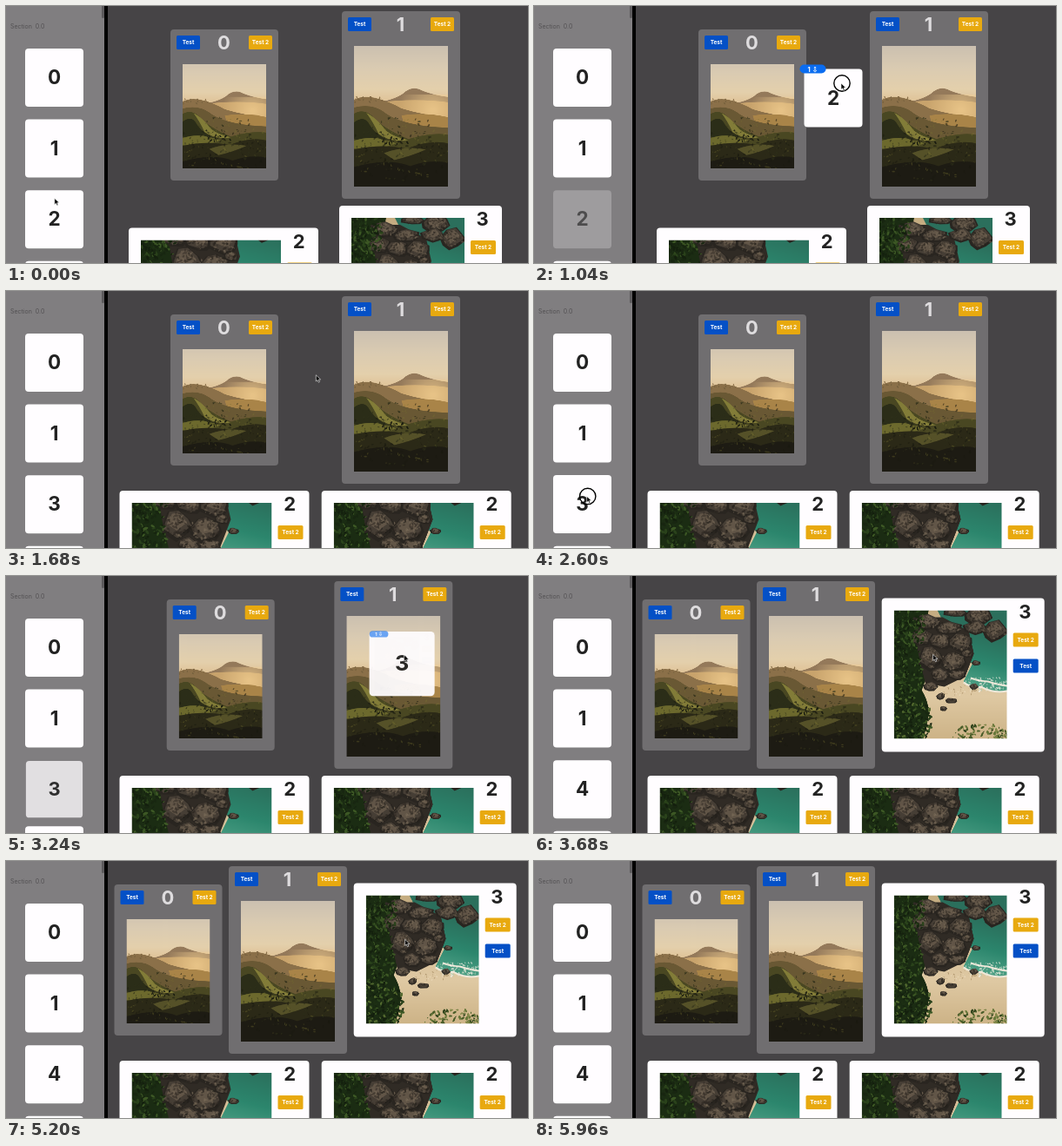
These frames come from a looping animation (600x296 px, 6000 ms). An HTML page with a canvas:

```html
<!DOCTYPE html>
<html lang="en">
<head>
<meta charset="utf-8">
<title>Drag and drop between two collections</title>
<style>
html, body { margin: 0; width: 100%; height: 100%; overflow: hidden; background: #464446; }
#stage { position: absolute; left: 0; top: 0; width: 600px; height: 296px; overflow: hidden;
  background: #464446; font-family: Inter, Roboto, sans-serif; }
#stage div, canvas, svg { position: absolute; left: 0; top: 0; box-sizing: border-box; }
#stage .side { width: 113px; height: 296px; background: #807e80; overflow: hidden; }
#stage .rule { left: 113px; width: 4px; height: 296px; background: #000; }
#stage .thumb { left: 110px; width: 3px; height: 14px; background: #5c5a5c; border-radius: 0 0 2px 2px; }
#stage .section { left: 5px; top: 19px; font-size: 7px; line-height: 10px; color: #525052; white-space: pre; }
.tile { width: 67px; height: 67px; border-radius: 4px; background: #fffdff; color: #222;
  font-size: 22.5px; font-weight: 700; line-height: 66px; text-align: center; }
.card { border-radius: 4px; background: #fffdff; color: #222; transform-origin: 0 0; }
.card.dark { background: #706e70; color: #dedcde; }
.title { width: 30px; height: 24px; font-size: 22px; font-weight: 700; line-height: 24px; text-align: center; }
.button { height: 16px; border-radius: 1.5px; color: #fff; font-size: 6.5px; font-weight: 700;
  line-height: 16px; text-align: center; white-space: pre; }
.preview { transform-origin: 0 0; }
.badge { width: 30px; height: 10px; border-radius: 5px; background: #0a6cf0; color: #fff; font-size: 7.5px;
  font-weight: 700; line-height: 10px; text-align: center; white-space: pre; }
.badge span { font-family: "DejaVu Sans", sans-serif; font-size: 8.5px; }
</style>
</head>
<body>
<div id="stage"></div>
<script>
const LOOP = 6000, DROP = 400, TILE = 67;
const stage = document.getElementById('stage');

const clamp = v => Math.max(0, Math.min(1, v));
const ease = v => { v = clamp(v); return v * v * (3 - 2 * v); };
const mix = (a, b, p) => a + (b - a) * p;

function add(parent, cls, text = '', box = {}) {
  const el = document.createElement('div');
  el.className = cls;
  el.textContent = text;
  for (const k in box) el.style[k] = box[k] + 'px';
  parent.append(el);
  return el;
}

function random(seed) {
  return () => {
    seed = (seed * 1664525 + 1013904223) >>> 0;
    return seed / 4294967296;
  };
}

function layers(g, list) {
  for (const [color, d] of list) {
    g.fillStyle = color;
    g.fill(new Path2D(d));
  }
}

function gradient(g, x, y, colors) {
  const fill = g.createLinearGradient(0, 0, x, y);
  colors.forEach((c, i) => fill.addColorStop(i / (colors.length - 1), c));
  return fill;
}

// Small random dabs inside an ellipse
function scatter(g, rnd, n, [cx, cy, rx, ry], size, colors) {
  for (let i = 0; i < n; i++) {
    const a = rnd() * 6.283, d = Math.sqrt(rnd()), s = size * (0.5 + rnd());
    g.fillStyle = colors[Math.floor(rnd() * colors.length)];
    g.beginPath();
    g.ellipse(cx + Math.cos(a) * rx * d, cy + Math.sin(a) * ry * d, s, s * 0.5, rnd() * 3.14, 0, 6.283);
    g.fill();
  }
}

function hills(g) {
  const rnd = random(7);
  g.fillStyle = gradient(g, 0, 100, ['#cbc0b0', '#dacbb2', '#e4d0ac', '#dcb988', '#b08d5a']);
  g.fillRect(0, 0, 107, 162);
  layers(g, [
    ['#94795a', 'M28 65Q46 62 56 55Q64 47 74 50Q86 56 107 59V70H28Z'],
    ['#c8a36c', 'M30 65Q70 60 107 65V100H30Z']
  ]);
  const glow = g.createRadialGradient(90, 74, 2, 90, 74, 40);
  glow.addColorStop(0, 'rgba(244,208,146,.7)');
  glow.addColorStop(1, 'rgba(244,208,146,0)');
  g.fillStyle = glow;
  g.fillRect(0, 56, 107, 60);
  layers(g, [
    ['#8b7049', 'M0 62Q10 57 24 60Q40 64 54 72Q80 80 107 82V110H0Z'],
    ['#a98448', 'M54 80Q80 76 107 82V100H60Z'],
    ['#695834', 'M0 71Q20 66 34 76Q54 92 107 94V125H0Z'],
    ['#494722', 'M0 78Q10 72 20 80Q34 96 62 107Q90 99 107 102V162H0Z'],
    ['#827c38', 'M14 77Q26 83 36 97Q46 105 62 108Q44 112 28 101Q22 88 14 77Z'],
    ['#2b2d18', 'M0 88Q12 79 18 91Q26 104 44 110L30 116L0 107Z'],
    ['#6c692d', 'M0 109Q22 101 48 112Q30 120 0 118Z'],
    ['#2b2917', 'M0 119Q30 112 60 118Q88 107 107 112V162H0Z'],
    ['#555128', 'M34 123Q58 114 82 119Q64 127 46 131Z'],
    ['#1d1b13', 'M0 139Q40 128 64 138Q86 130 107 134V162H0Z']
  ]);
  scatter(g, rnd, 240, [52, 118, 62, 38], 1.3, ['#1b1b1188', '#7b743455', '#2f301a99']);
  scatter(g, rnd, 40, [10, 62, 24, 4], 1, ['#75603e', '#8b7049']);
  scatter(g, rnd, 24, [46, 109, 17, 5], 1.4, ['#191b10', '#242414']);
}

function rock(g, rnd, x, y, rx, ry) {
  const spots = Array.from({ length: 8 }, (_, i) => {
    const a = i * 0.785 + rnd() * 0.4, d = 0.85 + rnd() * 0.3;
    return [Math.cos(a) * d * rx, Math.sin(a) * d * ry];
  });
  [['#292520', 1, 0], ['#463e35', 0.84, 0.12], ['#615547', 0.55, 0.25]].forEach(([c, k, lift]) => {
    g.fillStyle = c;
    g.beginPath();
    spots.forEach(([dx, dy]) => g.lineTo(x + dx * k, y + dy * k - ry * lift));
    g.fill();
  });
  const n = Math.round(rx * ry * 0.35);
  scatter(g, rnd, n, [x, y, rx * 0.85, ry * 0.8], 1.4, ['#231f1b99', '#332d2699', '#83745f66']);
}

function cove(g) {
  const rnd = random(21);
  const greens = ['#14200e', '#1d2f14', '#2a421b', '#3d5825', '#182611'];
  g.fillStyle = gradient(g, 0, 148, ['#c4ab80', '#d2bb94', '#dfc9a3', '#cdb387']);
  g.fillRect(0, 0, 130, 148);
  g.fillStyle = gradient(g, -25, 95, ['#2b6f5c', '#2c866d', '#53a489', '#b3cdb3']);
  g.fill(new Path2D('M50 0H130V92Q114 96 100 88Q88 90 80 82L90 62L60 20Z'));
  g.strokeStyle = '#f0e9da';
  g.lineWidth = 2;
  g.stroke(new Path2D('M80 83Q90 90 100 88Q114 96 130 93M88 78Q100 82 108 82Q120 86 130 87'));
  scatter(g, rnd, 90, [106, 85, 26, 9], 1.2, ['#f5f1e6bb', '#dfe5d6aa', '#a9cbb499']);
  layers(g, [
    ['#1b2c13', 'M0 0H40Q34 24 40 44Q42 68 32 92Q44 112 38 130L34 148H0Z'],
    ['#302b25', 'M22 8H56L86 24L92 50L82 76L58 88L36 84L28 50Z']
  ]);
  const rocks = [
    [70, 3, 13, 5], [98, 7, 16, 11], [116, 24, 15, 12], [94, 20, 14, 8],
    [38, 14, 17, 10], [62, 21, 17, 8], [32, 32, 14, 10], [54, 36, 14, 9], [77, 37, 15, 11],
    [42, 55, 15, 14], [68, 59, 17, 12], [84, 50, 7, 5], [52, 75, 11, 9], [72, 74, 10, 6],
    [94, 61, 5, 3], [92, 88, 5, 4], [42, 88, 8, 6], [54, 99, 5, 4], [66, 104, 7, 3], [57, 113, 4, 3]
  ];
  rocks.forEach(r => rock(g, rnd, ...r));
  scatter(g, rnd, 50, [70, 92, 26, 7], 0.9, ['#a58a62aa', '#efe0c3aa']);
  scatter(g, rnd, 320, [10, 20, 27, 30], 1.9, greens);
  scatter(g, rnd, 300, [8, 68, 25, 42], 1.9, greens);
  scatter(g, rnd, 360, [14, 128, 30, 30], 1.9, [...greens, '#53692f']);
  scatter(g, rnd, 180, [100, 148, 36, 17], 1.8, ['#4a5d29', '#68783a', '#33451e', '#83894a']);
}

// Paints a picture so that it covers the box, centred
function photo(parent, draw, bw, bh, x, y, w, h) {
  const c = document.createElement('canvas'), g = c.getContext('2d');
  c.width = w * 2;
  c.height = h * 2;
  Object.assign(c.style, { left: x + 'px', top: y + 'px', width: w + 'px', height: h + 'px' });
  const k = 2 * Math.max(w / bw, h / bh);
  g.translate(w - bw * k / 2, h - bh * k / 2);
  g.scale(k, k);
  draw(g);
  parent.append(c);
}

function button(parent, text, left, top, width) {
  add(parent, 'button', text, { left, top, width }).style.background = text === 'Test' ? '#0450c6' : '#e8a90f';
}

function darkCard(n, w, h) {
  const el = add(stage, 'card dark', '', { width: w, height: h });
  add(el, 'title', n, { left: w / 2 - 15.5, top: 3.2 });
  button(el, 'Test', 7, 7, 27);
  button(el, 'Test 2', w - 34, 7, 27);
  photo(el, hills, 107, 162, 14, 40, w - 28.5, h - 54.5);
  return { el, w, h };
}

function lightCard(n, w, h) {
  const el = add(stage, 'card', '', { width: w, height: h });
  photo(el, cove, 130, 148, 14, 14.2, w - 57, h - 28.5);
  add(el, 'title', n, { left: w - 37.3, top: 3.2 });
  button(el, 'Test 2', w - 36, 40, 29);
  button(el, 'Test', w - 36, 70, 29);
  return { el, w, h };
}

function place(el, x, y, sx = 1, sy = 1) {
  el.style.transform = `translate(${x}px,${y}px) scale(${sx},${sy})`;
}

const zero = darkCard(0, 124, 174), one = darkCard(1, 136, 216);
const oldTwo = lightCard(2, 218, 126), oldThree = lightCard(3, 187, 176.5);

const side = add(stage, 'side');
add(stage, 'rule');
add(side, 'thumb');
add(side, 'section', 'Section  0.0');
const slotY = i => 49 + 81.6 * i;
const tiles = [0, 1, 2, 3, 4, 5].map(n => add(side, 'tile', n, { left: 22 }));

// Each drag: lift and drop times, offset from pointer to tile centre, final box
const drags = [
  { n: 2, lift: 400, drop: 1272, dx: -9, dy: 17, x: 130.5, y: 230, card: lightCard(2, 218, 126) },
  { n: 3, lift: 2600, drop: 3178, dx: -5.2, dy: 9.2, x: 399.7, y: 25.5, card: lightCard(3, 187, 176.5) }
];
for (const d of drags) {
  d.preview = add(stage, 'tile preview', d.n);
  d.badge = add(stage, 'badge', '1 ');
  d.badge.append(Object.assign(document.createElement('span'), { textContent: '⇩' }));
}

stage.insertAdjacentHTML('beforeend', `<svg width="600" height="296">
  <circle id="ring" r="9.2" fill="none" stroke="#000" stroke-width="1.4"/>
  <path id="arrow" d="M0 0V7.2L1.7 5.7L2.9 8.4L4.2 7.8L3 5.2L5.3 5.1Z" fill="#000" stroke="#fff" stroke-width=".6"/>
</svg>`);
const ring = document.getElementById('ring'), arrow = document.getElementById('arrow');

const path = [
  [0, 55.8, 221.5], [160, 64.5, 228.5], [400, 64.5, 228.5], [960, 353, 89], [1300, 353, 89],
  [1640, 356.3, 96.8], [1760, 356.3, 96.8], [2400, 60.7, 236.4], [2620, 60.7, 236.4],
  [3080, 457.6, 91], [3240, 457.6, 91], [3600, 458.6, 90.3], [5200, 458.6, 90.3],
  [5680, 470, -16], [LOOP, 470, -16]
];
const presses = [[200, 1272], [2440, 3178]];

function pointer(t) {
  const i = path.findIndex(k => k[0] > t);
  const [t0, x0, y0] = path[i - 1], [t1, x1, y1] = path[i];
  const p = ease((t - t0) / (t1 - t0));
  return [mix(x0, x1, p), mix(y0, y1, p)];
}

function drawDrag(d, t, p) {
  const held = t >= d.lift, dropped = t >= d.drop;
  const [px, py] = pointer(Math.min(t, d.drop));
  const { w, h, el } = d.card;
  const cw = mix(TILE, w, p), ch = mix(TILE, h, p);
  const x = mix(px + d.dx, d.x + w / 2, p) - cw / 2;
  const y = mix(py + d.dy, d.y + h / 2, p) - ch / 2;
  place(el, x, y, cw / w, ch / h);
  el.style.opacity = dropped ? Math.min(1, p * 1.5) : 0;
  place(d.preview, x, y, cw / TILE, ch / TILE);
  d.preview.style.opacity = held ? 1 - p : 0;
  const shown = clamp((t - d.lift - 150) / 120) * clamp(1 - 6 * p);
  place(d.badge, x - 5 + p * 15, y - 5 + p * 45, mix(0.3, 1, shown), mix(0.3, 1, shown));
  d.badge.style.opacity = shown;
}

function drawTile(el, n, t, ps) {
  let row = n, scale = 1, plate = 1, ink = 1;
  drags.forEach((d, i) => {
    if (n > d.n) row -= ps[i];
    if (n !== d.n) return;
    if (t >= d.drop) {
      plate = 0.82 * (1 - ps[i]);
      ink = 1 - ps[i];
      scale = 1 - 0.4 * ps[i];
    } else if (t >= d.lift) {
      plate = 0.23;
      ink = 0.65;
    }
  });
  place(el, 0, slotY(row), scale, scale);
  el.style.background = `rgba(255,253,255,${plate})`;
  el.style.color = `rgba(34,34,34,${ink})`;
}

function render(t) {
  const ps = drags.map(d => ease((t - d.drop) / DROP));
  const [a, b] = ps;
  place(zero.el, mix(189, 124.5, b), 27);
  place(one.el, mix(386, 256, b), 6);
  place(oldTwo.el, mix(141, 362.7, a), mix(255.5, 230, a));
  place(oldThree.el, mix(383, 162, a), mix(230, 364, a));
  drags.forEach((d, i) => drawDrag(d, t, ps[i]));
  tiles.forEach((el, n) => drawTile(el, n, t, ps));
  const [x, y] = pointer(t);
  arrow.setAttribute('transform', `translate(${x},${y})`);
  ring.setAttribute('transform', `translate(${x + 1},${y})`);
  ring.style.display = presses.some(([from, to]) => t >= from && t < to) ? '' : 'none';
}

function tick() {
  render(performance.now() % LOOP);
  requestAnimationFrame(tick);
}
tick();
</script>
</body>
</html>
```
